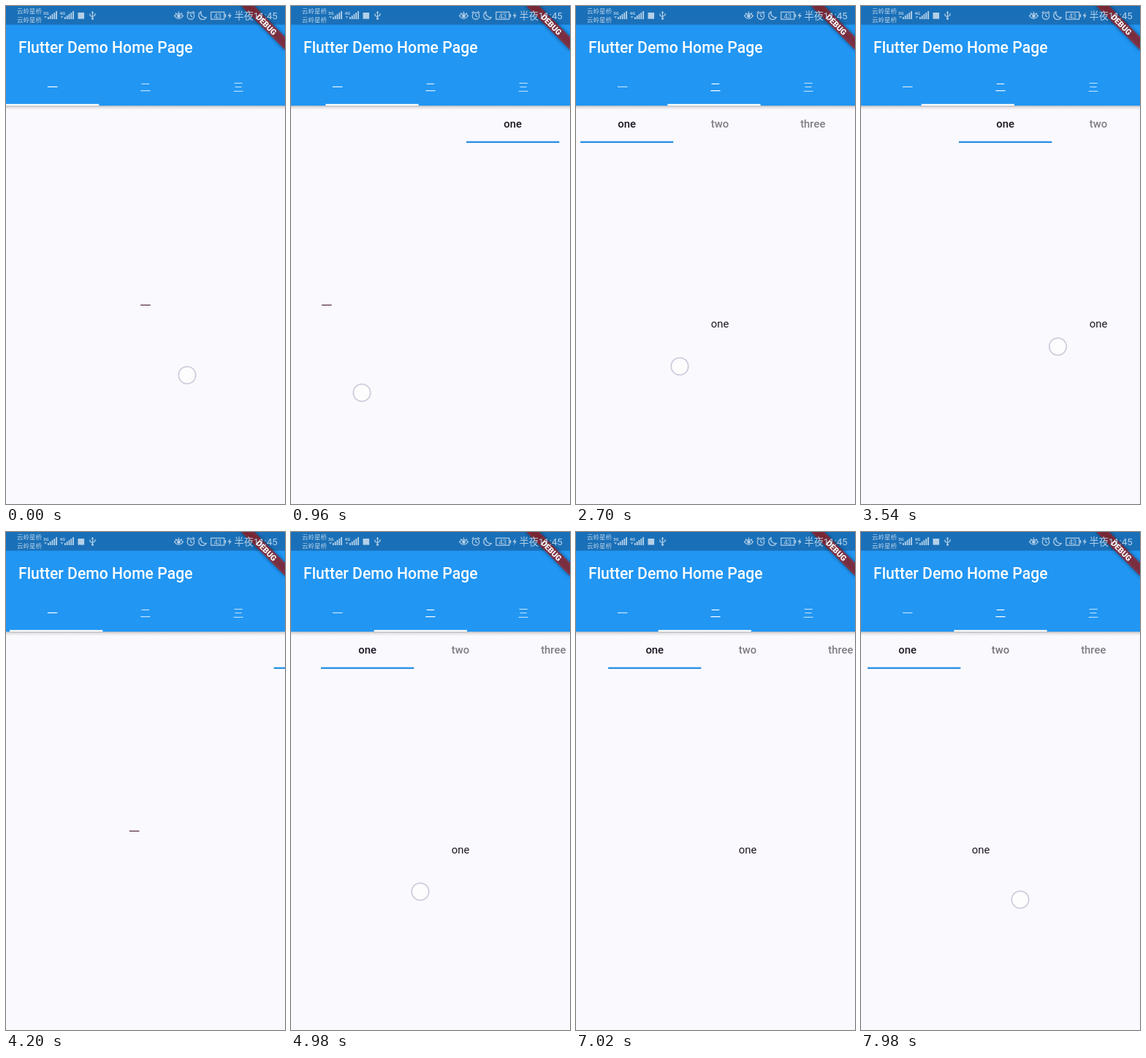
These frames come from a looping animation (382x680 px, 8 s). An HTML page:

```html
<!DOCTYPE html>
<html lang="zh">
<head>
<meta charset="utf-8">
<title>Nested tabs</title>
<style>
  html, body { margin: 0; width: 100%; height: 100%; overflow: hidden; background: #faf9fd; }
  svg { display: block; width: 100vw; height: 100vh; }
  text { font-family: Roboto, "Noto Sans CJK SC", "Noto Sans CJK", sans-serif; }
  .mid { text-anchor: middle; }
  .tab { font-size: 14.86px; font-weight: 500; text-anchor: middle; }
  .body { font-size: 14.86px; text-anchor: middle; }
  .line { fill: none; stroke: #b4d0e8; stroke-width: 1.2; }
</style>
</head>
<body>
<svg viewBox="0 0 382 680">
  <defs>
    <linearGradient id="shade" x2="0" y2="1">
      <stop offset="0" stop-color="#000" stop-opacity=".26"/>
      <stop offset=".4" stop-color="#000" stop-opacity=".09"/>
      <stop offset="1" stop-color="#000" stop-opacity="0"/>
    </linearGradient>
    <filter id="blur" x="-20%" y="-100%" width="140%" height="300%"><feGaussianBlur stdDeviation="2.6"/></filter>
    <g id="bars" fill="#b4d0e8">
      <path d="M0 15h1.8v3h-1.8zM2.8 13h1.8v5h-1.8zM5.6 11h1.8v7h-1.8zM8.4 9h1.8v9h-1.8zM11.2 7h1.8v11h-1.8z"/>
    </g>
  </defs>

  <rect width="382" height="680" fill="#faf9fd"/>

  <text id="first" class="body" y="414.3" fill="#55283c">一</text>
  <g id="second">
    <g id="innerTabs" fill="#1a1420">
      <text class="tab" x="63.7" y="165.7">one</text>
      <text class="tab" x="191" y="165.7">two</text>
      <text class="tab" x="318.3" y="165.7">three</text>
    </g>
    <rect id="innerBar" y="184.6" width="127.3" height="2.4" fill="#2b93e4"/>
    <text id="innerBody" class="body" y="438.7" fill="#1f1724">one</text>
  </g>

  <rect y="136" width="382" height="6" fill="url(#shade)"/>
  <rect width="382" height="136" fill="#2196f3"/>
  <rect width="382" height="25.5" fill="#1a70b8"/>
  <text x="17" y="64" font-size="21.2" font-weight="500" fill="#fff">Flutter Demo Home Page</text>
  <g id="outerTabs" fill="#fff">
    <text class="tab" x="63.7" y="116.3">一</text>
    <text class="tab" x="191" y="116.3">二</text>
    <text class="tab" x="318.3" y="116.3">三</text>
  </g>
  <rect id="outerBar" y="133.8" width="127.3" height="2.2" fill="#fff"/>

  <g transform="translate(382 0) rotate(45)">
    <rect x="-43" y="29.7" width="86" height="12.7" opacity=".5" filter="url(#blur)"/>
    <rect x="-43" y="29.7" width="86" height="12.7" fill="#b71c1c" fill-opacity=".627"/>
    <text class="mid" y="39.9" font-size="10.8" font-weight="900" fill="#fff">DEBUG</text>
  </g>

  <g fill="#b4d0e8">
    <g font-size="8.5">
      <text x="15" y="10.3">云岭星桥</text>
      <text x="15" y="22.3">云岭星桥</text>
    </g>
    <g font-size="6" font-weight="700">
      <text x="51" y="11.5" textLength="">3G</text>
      <text x="73.5" y="11.5">4G</text>
    </g>
    <path d="M52 14l2 3 2-3zM74.5 14l2 3 2-3z" opacity=".7"/>
    <use href="#bars" x="57"/>
    <use href="#bars" x="80"/>
    <rect x="98.5" y="9" width="8.6" height="8.6"/>
    <path class="line" d="M118.5 9v8M115 10.5v2.5l3.5 2M122 10v2.500l-3.500 2"/>
    <path d="M116.700 9.500l1.800-2.700 1.800 2.700z"/>
    <circle cx="118.500" cy="17.300" r="1.500"/>
    <path class="line" d="M230.500 13.500q6-6.500 12 0q-6 7.500-12 0zM232 9.500l1.500 1.500M236.500 7.500v2M241 9.500l-1.500 1.500"/>
    <circle cx="236.500" cy="13.700" r="2.400"/>
    <circle class="line" cx="253" cy="13.500" r="4.700"/>
    <path class="line" d="M253 10.500v3.200l2.300 1.300M247.700 9.500l2.600-2.200M258.300 9.500l-2.600-2.200"/>
    <path class="line" d="M267 7.800a5.600 5.600 0 1 0 7.300 7.700a6.200 6.200 0 0 1-7.300-7.700z"/>
    <rect class="line" x="280.800" y="8.300" width="18" height="9.800" stroke-width="1"/>
    <rect x="299.600" y="11" width="1.600" height="4.400"/>
    <text class="mid" x="289.800" y="16.700" font-size="9.500">43</text>
    <path d="M307.500 8.500l-4 5.200h2.600l-1.200 4.300 4-5.400h-2.600z"/>
    <text x="312.500" y="18" font-size="13.200">半夜11:45</text>
  </g>

  <circle id="touch" r="11.700" fill="#fff" fill-opacity=".65" stroke="#cfccdd" stroke-width="1.800"/>
</svg>

<script>
const LOOP = 8000, STEP = 60, W = 382, TAB = W / 3;
const $ = id => document.getElementById(id);

// Finger keys: time, page scroll, x, y. Lifting the finger lets a spring take over.
const swipes = [
  { to: W, keys: [[0, 0, 248, 504], [240, 0, 248, 504], [600, 62, 177, 518], [960, 142, 97, 528], [1340, 226, 13, 526]] },
  { to: 0, keys: [[2460, W, 122, 495], [2700, 376, 142, 492], [3300, 297, 221, 475], [3540, 248, 269.5, 465], [3900, 150, 368, 456]] },
  { to: 0, keys: [[4800, W, 127, 491], [4980, 341, 177, 491], [5680, 152, 366, 478]] },
  { to: W, keys: [[6360, 0, 252, 497], [6440, 8, 238, 498], [6850, 232, 12, 513]] },
  { inner: true, to: W, keys: [[7740, 0, 254, 503], [7980, 27, 218, 502], [8040, 36, 209, 502]] }
];

const slope = (a, b, c) => (b[c] - a[c]) / (b[0] - a[0]);

function follow(keys, t, c) {
  const i = Math.max(0, keys.findIndex(k => k[0] > t) - 1);
  const a = keys[i], b = keys[i + 1], m = slope(a, b, c);
  if (!m) return a[c];
  const before = i ? slope(keys[i - 1], a, c) : m;
  const after = keys[i + 2] ? slope(b, keys[i + 2], c) : m;
  const d = b[0] - a[0], u = (t - a[0]) / d, v = 1 - u;
  const ma = before ? (before + m) / 2 : 0, mb = (m + after) / 2;
  return a[c] * v * v * (1 + 2 * u) + b[c] * u * u * (3 - 2 * u)
    + d * u * v * (ma * v - mb * u);
}

// Overdamped spring: mass 0.5, stiffness 100, damping ratio 1.1.
function settle({ keys, to }, t) {
  const [prev, last] = keys.slice(-2);
  const slow = 9.07, fast = 22.04, s = (t - last[0]) / 1000;
  const gap = last[1] - to, speed = slope(prev, last, 1) * 1000;
  const a = (fast * gap + speed) / (fast - slow);
  const rest = a * Math.exp(-slow * s) + (gap - a) * Math.exp(-fast * s);
  return Math.abs(rest) < 0.4 ? to : to + rest;
}

function stateAt(t) {
  const state = { outer: 0, inner: 0, touch: null };
  for (const sw of swipes) {
    const { keys } = sw;
    if (t < keys[0][0]) break;
    const held = t < keys[keys.length - 1][0];
    state[sw.inner ? "inner" : "outer"] = held ? follow(keys, t, 1) : settle(sw, t);
    state.touch = held ? [follow(keys, t, 2), follow(keys, t, 3)] : null;
  }
  return state;
}

function shadeTabs(id, page, dim) {
  [...$(id).children].forEach((tab, i) => {
    const near = Math.max(0, 1 - Math.abs(page - i));
    tab.setAttribute("fill-opacity", dim + (1 - dim) * near);
  });
}

function draw(t) {
  const { outer, inner, touch } = stateAt(t);
  $("first").setAttribute("x", W / 2 - outer);
  $("second").setAttribute("transform", `translate(${W - outer} 0)`);
  $("outerBar").setAttribute("x", outer / W * TAB);
  $("innerBar").setAttribute("x", inner / W * TAB);
  $("innerBody").setAttribute("x", W / 2 - inner);
  shadeTabs("outerTabs", outer / W, 0.7);
  shadeTabs("innerTabs", inner / W, 0.54);
  $("touch").setAttribute("visibility", touch ? "visible" : "hidden");
  if (touch) $("touch").setAttribute("transform", `translate(${touch})`);
}

const start = performance.now();
function tick() {
  const t = (performance.now() - start) % LOOP;
  draw(Math.floor(t / STEP) * STEP);
  requestAnimationFrame(tick);
}
tick();
</script>
</body>
</html>
```
